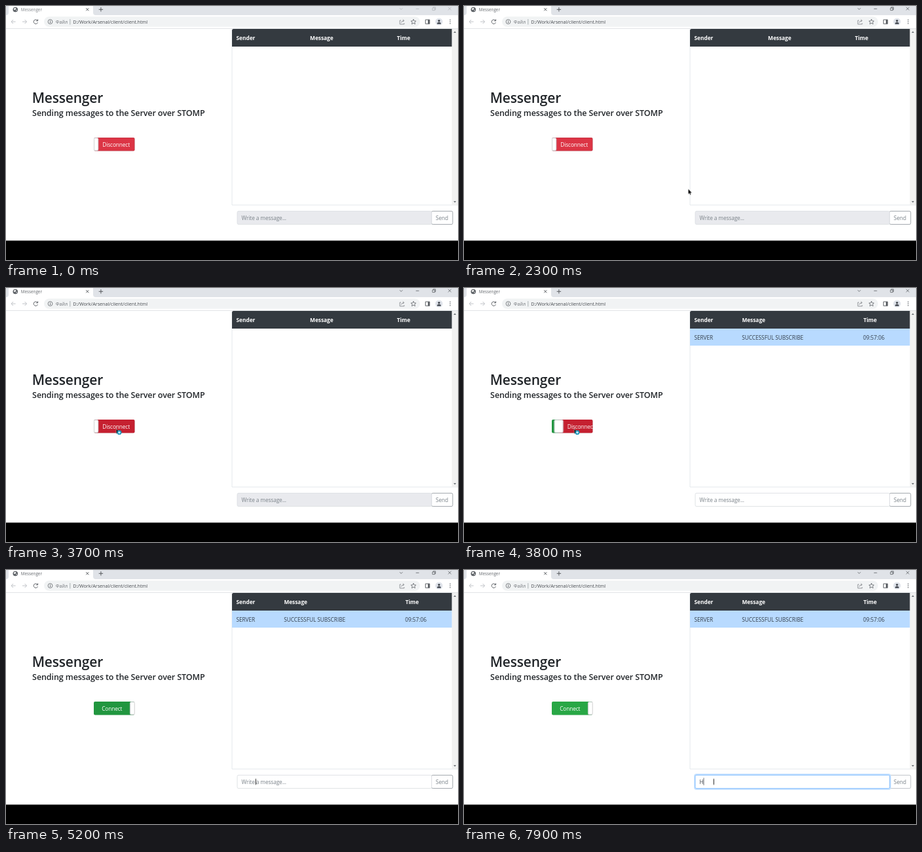
Recreate the animation shown at these times as an HTML page. Size 690 px wide and 388 px high, loop 8000 ms.

```html
<!DOCTYPE html>
<html lang="en">
<head>
<meta charset="utf-8">
<title>Messenger</title>
<style>
html, body { margin: 0; width: 100%; height: 100%; overflow: hidden; background: #fff; }
svg { display: block; width: 690px; height: 388px; font-family: "Open Sans", "Noto Sans", sans-serif; }
text { font-size: 8.3px; letter-spacing: -.11px; }
.line { fill: none; stroke: #5f6368; stroke-width: 1; }
.th { font-weight: 700; fill: #fff; letter-spacing: 0; }
.td { fill: #343e4a; letter-spacing: -.04px; }
.h { font-weight: 600; fill: #212529; }
.mid { text-anchor: middle; fill: #fff; }
.rim { fill: none; stroke: #c4c4c4; stroke-width: .8; mix-blend-mode: darken; }

/* 1% of the loop is 80 ms, one tick (100 ms) is 1.25% */
.a { animation: 8s step-end infinite; }
.chrome { animation-name: chrome; }
.tabname { animation-name: tabname; }
.before { animation-name: before; }
.after { animation-name: after; }
.off { animation-name: off; }
.on { animation-name: on; }
.group { animation-name: slide; }
.field { animation-name: field; }
.glow { animation-name: glow; }
.send { animation-name: send; }
.hint { animation-name: hint; }
.typed { animation-name: typed; }
.caret1 { animation-name: caret1; }
.caret2 { animation-name: caret2; }
.pointer { animation-name: move; }
.arrow { animation-name: arrow; }
.busy { animation-name: busy; }
.beam { animation-name: beam; }

@keyframes chrome { 0% { stroke: #b4b7bb; } 20%, 100% { stroke: #5c6064; } }
@keyframes tabname { 0% { fill: #808489; } 20%, 100% { fill: #65696e; } }
@keyframes before { 0% { opacity: 1; } 47.5%, 100% { opacity: 0; } }
@keyframes after { 0% { opacity: 0; } 47.5%, 100% { opacity: 1; } }
@keyframes off { 0% { fill: #dc3545; } 37.5% { fill: #d02a3a; } 38.75%, 100% { fill: #c52030; } }
@keyframes on { 0% { fill: #21963f; } 75%, 100% { fill: #28a745; } }
@keyframes slide {
  0% { transform: translate(-62px, 0); }
  47.5% { transform: translate(-51.5px, 0); }
  48.75% { transform: translate(-17px, 0); }
  50% { transform: translate(-3px, 0); }
  51.25%, 100% { transform: translate(0, 0); }
}
@keyframes field {
  0% { fill: #e9eaee; stroke: #dcdfe3; }
  47.5% { fill: #fff; stroke: #dcdfe3; }
  70% { fill: #fff; stroke: #a7c9ed; }
  71.25%, 100% { fill: #fff; stroke: #80bdff; }
}
@keyframes glow { 0% { opacity: 0; } 70% { opacity: .5; } 71.25%, 100% { opacity: 1; } }
@keyframes send { 0% { stroke: #a0a6ac; } 75%, 100% { stroke: #c0c4c9; } }
@keyframes hint { 0% { opacity: 1; } 85%, 100% { opacity: 0; } }
@keyframes typed { 0% { opacity: 0; } 85%, 100% { opacity: 1; } }
@keyframes caret1 { 0% { opacity: 0; } 70% { opacity: 1; } 76.25% { opacity: 0; } 82.5% { opacity: 1; } 85%, 100% { opacity: 0; } }
@keyframes caret2 { 0% { opacity: 0; } 85% { opacity: 1; } 91.25% { opacity: 0; } 98.75%, 100% { opacity: 1; } }
@keyframes move {
  0% { transform: translate(445px, 333px); }
  23.75% { transform: translate(445px, 333px); animation-timing-function: steps(4, end); }
  28.75% { transform: translate(342px, 279.5px); animation-timing-function: steps(4, end); }
  33.75% { transform: translate(214px, 232px); }
  35% { transform: translate(202px, 228px); animation-timing-function: steps(4, end); }
  40% { transform: translate(168px, 215px); }
  50% { transform: translate(168px, 215px); animation-timing-function: steps(3, end); }
  53.75% { transform: translate(271px, 256px); animation-timing-function: steps(2, end); }
  56.25% { transform: translate(341px, 296.5px); animation-timing-function: steps(3, end); }
  60% { transform: translate(368px, 318px); animation-timing-function: steps(4, end); }
  65%, 100% { transform: translate(381px, 323.5px); }
}
@keyframes arrow { 0% { opacity: 0; } 23.75% { opacity: 1; } 60%, 100% { opacity: 0; } }
@keyframes busy { 0% { opacity: 0; } 46.25% { opacity: 1; } 51.25%, 100% { opacity: 0; } }
@keyframes beam { 0% { opacity: 0; } 60%, 100% { opacity: 1; } }
</style>
</head>
<body>
<svg viewBox="0 0 690 388">
  <defs>
    <clipPath id="pill"><rect x="134" y="201" width="62.5" height="20.4" rx="2"/></clipPath>
  </defs>
  <rect width="690" height="388" fill="#fff"/>

  <!-- tab strip -->
  <rect width="690" height="14" fill="#e0e3e8"/>
  <path d="M0 14Q4 14 4 10V0H133V10Q133 14 137 14Z" fill="#fff"/>
  <circle cx="14.3" cy="5.5" r="3.8" fill="#5f6368"/>
  <path d="M11.8 4.2q1.8-1.7 3.2-.8t-.4 1.8-1.6 1.4-1.2-2.4M15.2 6.4l1.8-.6-1 2.3z" fill="#fff"/>
  <text class="a tabname" x="22.8" y="7.8" style="font-size:6.3px;letter-spacing:0">Messenger</text>
  <path class="line" d="M122.3 3.3l4 4m0-4l-4 4M141.7 5.3h6.4m-3.2-3.2v6.4" style="stroke:#54585c"/>
  <g class="a chrome" fill="none" stroke-width=".8">
    <path d="M601 3.2l2.2 2.2 2.2-2.2M625.7 4.3h4.8M651 3h3.6v3.6H651zM652 3V1.9h3.7v3.7h-1.1M675 1.8l4.6 4.6m0-4.6l-4.6 4.6"/>
  </g>

  <!-- toolbar -->
  <rect y="34" width="690" height="1" fill="#e1e3e6"/>
  <rect x="58" y="16.2" width="574" height="15.6" rx="7.8" fill="#f1f3f4"/>
  <path class="line" d="M14.6 24H8m3-3l-3 3 3 3M25 24h6.6m-3-3l3 3-3 3" style="stroke:#c0c3c7"/>
  <path class="line" d="M48 22.2A3.2 3.2 0 1 0 48.4 25.2M48.6 20.4v2.4h-2.4" stroke-width="1.1"/>
  <circle class="line" cx="67.5" cy="24" r="3.4" style="stroke-width:.8"/>
  <path class="line" d="M67.5 23.5v2.4m0-4v.9"/>
  <text x="75.8" y="26.6" fill="#72767b" style="font-size:7.2px;letter-spacing:0">Файл</text>
  <path d="M97.8 20v8.4" stroke="#9aa0a6" stroke-width=".8"/>
  <text x="102.2" y="26.6" fill="#474b50" style="font-size:7.2px;letter-spacing:0">D:/Work/Arsenal/client/client.html</text>
  <path class="line" d="M603 22h-1.8v5.8h6.6V26M603.3 25.6q.5-3 4-3.2m-1.5-1.8l2 1.8-2 1.8" style="stroke:#7a7e83;stroke-width:.8"/>
  <path class="line" d="M622 20.2l1.1 2.6 2.8.2-2.1 1.8.7 2.8-2.5-1.5-2.5 1.5.7-2.8-2.1-1.8 2.8-.2z" style="stroke-width:.8"/>
  <path class="line" d="M640.3 21h6.4v6.2h-6.4z"/>
  <path d="M644 21h2.7v6.2H644z" fill="#5f6368"/>
  <circle cx="661" cy="24" r="5.6" fill="#dfe3ea"/>
  <path d="M658 27.5q0-2.7 3-2.7t3 2.7z" fill="#3c4048"/>
  <circle cx="661" cy="22.6" r="1.6" fill="#3c4048"/>
  <g fill="#5f6368"><circle cx="678" cy="21.2" r=".8"/><circle cx="678" cy="24" r=".8"/><circle cx="678" cy="26.8" r=".8"/></g>

  <!-- left side -->
  <text class="h" x="39.7" y="147.5" style="font-size:21px;letter-spacing:-.2px">Messenger</text>
  <text class="h" x="40.1" y="168.2" style="font-size:12.5px;letter-spacing:-.09px">Sending messages to the Server over STOMP</text>

  <g clip-path="url(#pill)">
    <g class="a group">
      <rect class="a on" x="134" y="201" width="62" height="21"/>
      <rect class="a off" x="196" y="201" width="63" height="21"/>
      <text class="mid" x="161.8" y="214.6">Connect</text>
      <text class="mid" x="230.2" y="214.6">Disconnect</text>
      <rect x="189.3" y="201.4" width="13.6" height="19.6" rx="2" fill="#fff" stroke="#b9bdc2" stroke-width=".8"/>
    </g>
  </g>
  <rect class="rim" x="134.4" y="201.4" width="61.8" height="19.6" rx="2"/>

  <!-- table -->
  <path d="M345 304V35H681" fill="none" stroke="#dee2e6" stroke-width=".8"/>
  <path d="M345 304H690" stroke="#dee2e6" stroke-width=".8"/>
  <rect x="680.6" y="35" width="9.4" height="269" fill="#f1f1f1"/>
  <path d="M683.2 41l2-2.4 2 2.4zM683.2 298l2 2.4 2-2.4z" fill="#70757a"/>
  <path d="M345 62V37.5Q345 35 347.5 35H680.6V62Z" fill="#343a40"/>
  <text class="th" x="351.5" y="51.8">Sender</text>
  <g class="a before">
    <text class="th" x="464.1" y="51.8">Message</text>
    <text class="th" x="596.7" y="51.8">Time</text>
  </g>
  <g class="a after">
    <text class="th" x="424.4" y="51.8">Message</text>
    <text class="th" x="609.7" y="51.8">Time</text>
    <rect x="345" y="62" width="335.6" height="26" fill="#b8daff"/>
    <text class="td" x="351.4" y="78.7">SERVER</text>
    <text class="td" x="424.3" y="78.7">SUCCESSFUL SUBSCRIBE</text>
    <text class="td" x="609.3" y="78.7">09:57:06</text>
  </g>

  <!-- message field -->
  <rect class="a send" x="649.5" y="313.4" width="32.4" height="20.2" rx="2" fill="#fff" stroke-width="1"/>
  <text x="656" y="327" fill="#7a8289">Send</text>
  <rect class="a glow" x="352.1" y="312.2" width="298.8" height="22.6" rx="2.6" fill="none" stroke="#bfdeff" stroke-width="1.8"/>
  <rect class="a field" x="353" y="313.4" width="296.8" height="20.2" rx="2" stroke-width=".9"/>
  <text class="a hint" x="359.6" y="327" fill="#7a8289">Write a message...</text>
  <text class="a typed" x="359.4" y="327" fill="#495057">H</text>
  <path class="a caret1" d="M360 317.5v11.3" stroke="#495057" stroke-width=".8"/>
  <path class="a caret2" d="M366 317.5v11.3" stroke="#495057" stroke-width=".8"/>

  <rect y="358.4" width="690" height="30" fill="#000"/>

  <g class="a pointer">
    <path class="a arrow" d="M.3 0V8L2.1 6.4 3.3 9 4.6 8.4 3.5 5.9H6Z" fill="#000" stroke="#fff" stroke-width=".4"/>
    <circle class="a busy" cx="5" cy="5.7" r="2.6" fill="#bfeaf5" stroke="#1593b8" stroke-width="1.6"/>
    <path class="a beam" d="M.3-4.5v9" stroke="#222" stroke-width="1"/>
  </g>
</svg>
</body>
</html>
```
